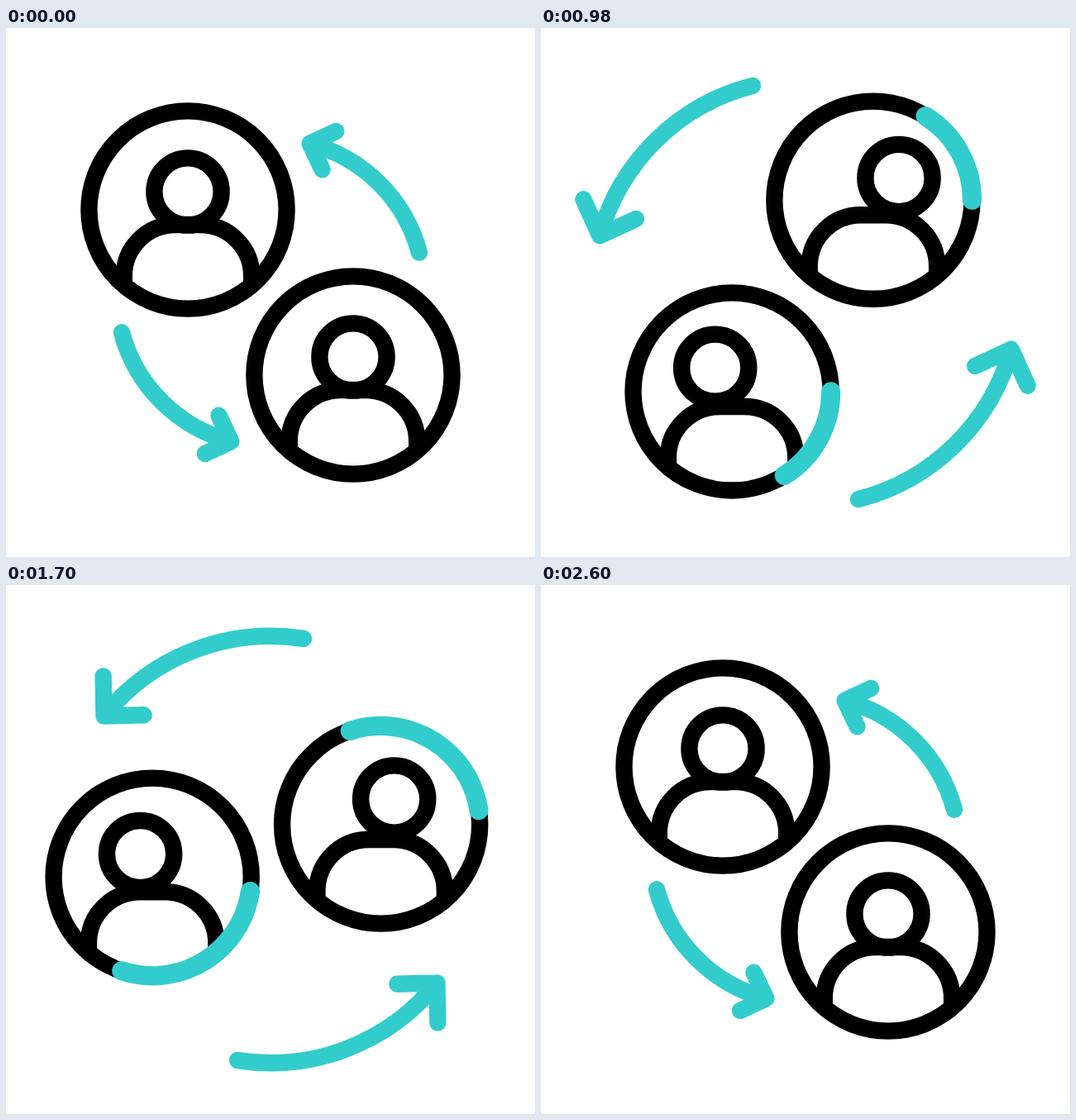
Write an HTML page with a canvas that moves like this. It is 640 px wide and 640 px high and loops after 3000 ms.

```html
<!DOCTYPE html>
<html lang="en">
<head>
<meta charset="utf-8">
<title>Swap people</title>
<style>
  html, body { margin: 0; width: 100%; height: 100%; overflow: hidden; background: #fff; }
  canvas { display: block; width: 640px; height: 640px; }
</style>
</head>
<body>
<canvas id="stage" width="640" height="640"></canvas>
<script>
const ctx = document.getElementById('stage').getContext('2d');
const LOOP = 3000, STEP = 20, START = 200, END = 2600;
const CENTER = 320, ORBIT = 141.4, RING = 119.6, LINE = 20.4;
const BLACK = '#000', TEAL = '#33cccc';

const rad = deg => deg * Math.PI / 180;
const progress = (t, from, to) => Math.min(1, Math.max(0, (t - from) / (to - from)));
const smooth = u => u * u * (3 - 2 * u);
const ramp = (t, from, to) => smooth(progress(t, from, to));

// Ease in and out with handles a quarter of the way in.
function softEase(p) {
  let lo = 0, hi = 1;
  for (let i = 0; i < 24; i++) {
    const s = (lo + hi) / 2, r = 1 - s;
    if (0.75 * r * r * s + 2.25 * r * s * s + s * s * s < p) lo = s; else hi = s;
  }
  return smooth((lo + hi) / 2);
}

// Smooth curve through values at the key times, at rest on both ends.
const KEYS = [START, 660, 780, 1180, 1500, 1920, 2200, END];
function track(values, t) {
  const last = KEYS.length - 1;
  if (t <= KEYS[0]) return values[0];
  if (t >= KEYS[last]) return values[last];
  let i = 0;
  while (t > KEYS[i + 1]) i++;
  const slope = k => k === 0 || k === last ? 0
    : (values[k + 1] - values[k - 1]) / (KEYS[k + 1] - KEYS[k - 1]);
  const d = KEYS[i + 1] - KEYS[i], u = (t - KEYS[i]) / d;
  return values[i] + (values[i + 1] - values[i]) * smooth(u)
    + d * slope(i) * u * (1 - u) ** 2 - d * slope(i + 1) * u * u * (1 - u);
}

const people = [
  { angle: 225, sweep: 1,
    drift: [0, 0.5, 0.7, -1.3, 2.2, 0.4, -0.8, 0],
    radius: [ORBIT, 150.6, 149.7, 148.2, 141.3, 133.9, 139, ORBIT],
    headX: [0, -16, -19.5, -17, 9.5, 19, 17, 0],
    headY: [0, -6, -6.5, -7, -8, -10, -9, 0] },
  { angle: 45, sweep: -1,
    drift: [0, 1, 1.4, -2.5, 1.3, 0.5, 0.1, 0],
    radius: [ORBIT, 141.8, 139.3, 139.3, 145.8, 146.8, 148.2, ORBIT],
    headX: [0, 25, 30.5, 26.5, -4.5, -20.5, -16, 0],
    headY: [0, -4.5, -5, -4.5, -5.5, -5.5, -4, 0] }
];

function stroke(color, width, cap, path) {
  ctx.strokeStyle = color;
  ctx.lineWidth = width;
  ctx.lineCap = cap;
  ctx.lineJoin = 'round';
  ctx.beginPath();
  path();
  ctx.stroke();
}

function drawPerson(person, t) {
  const turn = 360 * softEase(progress(t, START, END));
  const a = rad(person.angle - turn + track(person.drift, t));
  const r = track(person.radius, t);
  ctx.save();
  ctx.translate(CENTER + r * Math.cos(a), CENTER + r * Math.sin(a));

  stroke(BLACK, LINE, 'butt', () => {
    ctx.moveTo(-77.2, 88);
    ctx.lineTo(-77.2, 80);
    ctx.arc(-15.2, 80, 62, Math.PI, 1.5 * Math.PI);
    ctx.arc(15.2, 80, 62, 1.5 * Math.PI, 2 * Math.PI);
    ctx.lineTo(77.2, 88);
  });
  stroke(BLACK, LINE, 'butt', () =>
    ctx.arc(track(person.headX, t), track(person.headY, t) - 22, 40.6, 0, 2 * Math.PI));
  stroke(BLACK, LINE, 'butt', () => ctx.arc(0, 0, RING, 0, 2 * Math.PI));

  const tail = 360 * ramp(t, 1000, 2100), front = 360 * ramp(t, 700, 1800);
  if (front > tail) {
    stroke(TEAL, 23.2, 'round', () =>
      ctx.arc(0, 0, RING, rad(person.sweep * tail), rad(person.sweep * front), person.sweep < 0));
  }
  ctx.restore();
}

function drawArrow(angle, t) {
  const scale = 1 + 0.385 * (ramp(t, START, 700) - ramp(t, 1900, END));
  const r = 186.4 * scale, barb = 34.8 * scale;
  const tip = rad(-75.2), tipX = r * Math.cos(tip), tipY = r * Math.sin(tip);
  const barbTo = deg =>
    ctx.lineTo(tipX + barb * Math.cos(rad(deg)), tipY + barb * Math.sin(rad(deg)));
  ctx.save();
  ctx.translate(CENTER, CENTER);
  ctx.rotate(rad(angle - 360 * ramp(t, START, END)));
  stroke(TEAL, LINE, 'round', () => {
    ctx.arc(0, 0, r, rad(-15), tip, true);
    ctx.moveTo(tipX + barb * Math.cos(rad(-25)), tipY + barb * Math.sin(rad(-25)));
    ctx.lineTo(tipX, tipY);
    barbTo(64.6);
  });
  ctx.restore();
}

function draw(now) {
  const t = Math.floor((now % LOOP) / STEP) * STEP;
  ctx.fillStyle = '#fff';
  ctx.fillRect(0, 0, 640, 640);
  people.forEach(person => drawPerson(person, t));
  drawArrow(0, t);
  drawArrow(180, t);
}

let origin = null;
function tick(now) {
  if (origin === null) origin = now;
  draw(Math.max(0, now - origin));
  requestAnimationFrame(tick);
}
draw(0);
requestAnimationFrame(tick);
</script>
</body>
</html>
```
